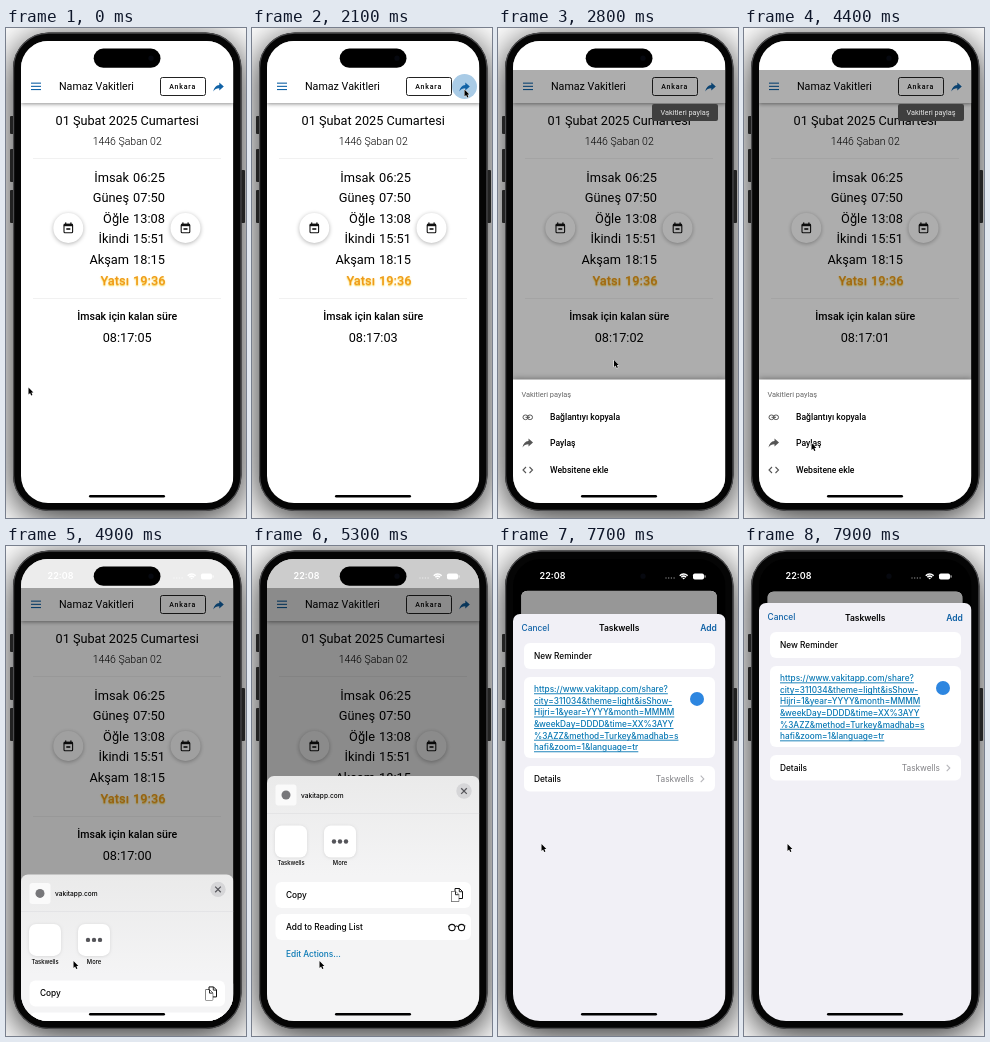
An HTML page with a canvas that plays this animation: 240 px wide and 490 px high, repeating every 8000 ms.

```html
<!DOCTYPE html>
<html lang="tr">
<head>
<meta charset="utf-8">
<title>Namaz Vakitleri</title>
<style>
html, body { margin: 0; width: 100%; height: 100%; overflow: hidden; background: #fff; }
canvas { display: block; width: 240px; height: 490px; }
</style>
</head>
<body>
<canvas id="stage"></canvas>
<script>
const LOOP = 8000;
const canvas = document.getElementById('stage');
const c = canvas.getContext('2d');
const dpr = window.devicePixelRatio || 1;
canvas.width = 240 * dpr;
canvas.height = 490 * dpr;

// screen of the phone
const L = 15, T = 13, W = 212.5, H = 462, MID = 121.2;
const ROBOTO = 'Roboto, "Open Sans", sans-serif';
const INTER = 'Inter, Roboto, sans-serif';
const BLUE = '#1062a6';
const LINK = '#0878b4';

const span = (t, a, b) => Math.min(1, Math.max(0, (t - a) / (b - a)));
const mix = (a, b, k) => a + (b - a) * k;
const easeIn = k => k * k;
const easeOut = k => 1 - (1 - k) ** 3;
const easeBoth = k => k * k * (3 - 2 * k);

function box(x, y, w, h, r, fill, stroke, lw = 1) {
  c.beginPath();
  c.roundRect(x, y, w, h, r);
  if (fill) { c.fillStyle = fill; c.fill(); }
  if (stroke) { c.strokeStyle = stroke; c.lineWidth = lw; c.stroke(); }
}

function rect(x, y, w, h, fill) {
  c.fillStyle = fill;
  c.fillRect(x, y, w, h);
}

function disc(x, y, r, fill) {
  c.beginPath();
  c.arc(x, y, r, 0, Math.PI * 2);
  c.fillStyle = fill;
  c.fill();
}

function path(pts, color, lw, closed) {
  c.beginPath();
  pts.forEach(([x, y], i) => i ? c.lineTo(x, y) : c.moveTo(x, y));
  if (closed) c.closePath();
  c.strokeStyle = color;
  c.lineWidth = lw;
  c.stroke();
}

// y is the middle of the capitals
function text(s, x, y, size, o = {}) {
  c.font = `${o.weight || 400} ${size}px ${o.font || ROBOTO}`;
  c.textAlign = o.align || 'left';
  c.letterSpacing = (o.gap || 0) + 'px';
  c.fillStyle = o.color || '#000';
  c.fillText(s, x, y + size * 0.355);
  const w = c.measureText(s).width;
  c.letterSpacing = '0px';
  return w;
}

const inter = (s, x, y, size, o = {}) => text(s, x, y, size, { font: INTER, weight: 500, ...o });

function shadow(color, blur, dy, draw) {
  c.save();
  c.shadowColor = color;
  c.shadowBlur = blur * dpr;
  c.shadowOffsetY = dy * dpr;
  draw();
  c.restore();
}

function arrowIcon(x, y, color) {
  c.beginPath();
  c.moveTo(x + 6, y - 4.5);
  c.lineTo(x + 10.5, y - 0.5);
  c.lineTo(x + 6, y + 3.5);
  c.lineTo(x + 6, y + 1.2);
  c.quadraticCurveTo(x + 2, y + 1.2, x, y + 4.5);
  c.quadraticCurveTo(x + 1, y - 1.6, x + 6, y - 2.1);
  c.closePath();
  c.fillStyle = color;
  c.fill();
}

function dateButton(x, y) {
  shadow('rgba(0,0,0,.3)', 4, 1, () => disc(x, y, 15, '#fff'));
  const ink = '#111';
  box(x - 4.3, y - 3.8, 8.6, 8.6, 1, null, ink, 1.1);
  rect(x - 4.5, y - 4.2, 9, 2.4, ink);
  rect(x - 3.2, y - 5.6, 1.2, 2, ink);
  rect(x + 2, y - 5.6, 1.2, 2, ink);
  rect(x - 2, y + 0.2, 4, 1.6, ink);
}

function phone() {
  rect(0, 0, 240, 490, '#fff');
  shadow('rgba(0,0,0,.85)', 36, 7, () => box(7, 4.5, 228.5, 478.5, 36, '#0a0a0a'));
  [[88, 18], [121, 33], [162, 33]].forEach(([y, h]) => box(4, y, 4, h, 1, '#222'));
  box(235, 142, 4, 53, 1, '#222');
  box(7.6, 5.1, 227.3, 477.3, 35, '#050505', '#4c4c4e', 1.2);
}

function ripple(t) {
  const grow = easeOut(span(t, 1880, 2080));
  const fade = 1 - span(t, 2200, 2550);
  if (grow > 0 && fade > 0) {
    c.globalAlpha = fade;
    disc(212.5, 58.5, 12.5 * grow, '#a9cbe6');
    c.globalAlpha = 1;
  }
}

function prayerPage(t) {
  rect(L, T, W, H, '#fff');
  shadow('rgba(0,0,0,.45)', 4, 1, () => rect(L, T, W, 62, '#fff'));

  [54.6, 57.8, 61].forEach(y => rect(25, y, 10, 1.1, BLUE));
  text('Namaz Vakitleri', 53, 58.5, 10.7);
  box(154.5, 49.5, 45, 18, 2, null, '#222');
  text('Ankara', 163.3, 58.5, 7, { weight: 500, gap: 0.8 });
  ripple(t);
  arrowIcon(207.3, 59, BLUE);

  const mid = { align: 'center' };
  text('01 Şubat 2025 Cumartesi', MID, 92, 12.7, mid);
  text('1446 Şaban 02', MID, 113, 10.5, { ...mid, weight: 300 });
  rect(27, 130, 188, 0.8, '#eeeeee');
  rect(27, 270, 188, 0.8, '#eeeeee');

  const rows = ['İmsak 06:25', 'Güneş 07:50', 'Öğle 13:08', 'İkindi 15:51', 'Akşam 18:15', 'Yatsı 19:36'];
  rows.forEach((row, i) => {
    const [name, hour] = row.split(' ');
    const y = 149 + i * 20.6;
    const last = i === 5;
    const o = last ? { weight: 500, color: '#ef9a1a' } : {};
    const put = () => {
      text(name, 123, y, 12.8, { ...o, align: 'right' });
      text(hour, 127, y, 12.8, o);
    };
    if (last) shadow('#f5c518', 1.5, 1, put);
    else put();
  });
  dateButton(62.3, 200);
  dateButton(179.5, 200);

  const left = 5 - Math.max(0, Math.min(5, Math.floor((t + 400) / 1000)));
  text('İmsak için kalan süre', MID, 288, 10.6, { ...mid, weight: 500 });
  text('08:17:0' + left, MID, 309, 12.7, mid);
}

function menuSheet(t) {
  const up = easeOut(span(t, 2300, 2750));
  const down = easeIn(span(t, 4650, 4950));
  rect(L, 42, W, 433, `rgba(0,0,0,${0.32 * span(t, 2300, 2600)})`);

  const tip = span(t, 2350, 2500) * (1 - span(t, 4700, 4900));
  if (tip > 0) {
    c.globalAlpha = tip;
    box(154, 76, 66, 17, 2, '#3f3f3f');
    text('Vakitleri paylaş', 187, 84.5, 7.3, { align: 'center', color: '#e8e8e8' });
    c.globalAlpha = 1;
  }
  if (up === 0 || down === 1) return;

  c.save();
  c.translate(0, 124 * (1 - up + down));
  shadow('rgba(0,0,0,.4)', 6, -1, () => rect(L, 351.5, W, 124, '#fff'));
  text('Vakitleri paylaş', 23.5, 366, 7.4, { color: '#666' });
  const grey = '#555';
  box(25, 387, 5, 4.6, 2.3, null, grey, 1);
  box(29.5, 387, 5, 4.6, 2.3, null, grey, 1);
  rect(27.5, 388.8, 4.5, 1, grey);
  arrowIcon(24.5, 415, grey);
  path([[28, 439], [25, 442], [28, 445]], grey, 1.1);
  path([[31.5, 439], [34.5, 442], [31.5, 445]], grey, 1.1);
  text('Bağlantıyı kopyala', 52, 389, 8.6, { weight: 500 });
  text('Paylaş', 52, 415, 8.6, { weight: 500 });
  text('Websitene ekle', 52, 441.5, 8.6, { weight: 500 });
  c.restore();
}

function copyIcon() {
  const ink = '#111';
  path([[203, 342.5], [207.5, 342.5], [210.5, 345.5], [210.5, 352.5], [203, 352.5]], ink, 1, true);
  c.fillStyle = '#fff';
  path([[199.5, 345.5], [203.7, 345.5], [206.7, 348.5], [206.7, 355.5], [199.5, 355.5]], ink, 1, true);
  c.fill();
  path([[203.5, 345.5], [203.5, 348.7], [206.7, 348.7]], ink, 0.9);
  path([[207.3, 342.5], [207.3, 345.7], [210.5, 345.7]], ink, 0.9);
}

function glassesIcon() {
  for (const x of [200, 209.5]) {
    c.beginPath();
    c.arc(x, 381.5, 3.1, 0, Math.PI * 2);
    c.strokeStyle = '#111';
    c.lineWidth = 1.1;
    c.stroke();
  }
  path([[203, 380.8], [204.7, 380], [206.5, 380.8]], '#111', 1);
  path([[196, 380], [197, 380.6]], '#111', 1);
  path([[213.4, 380], [212.5, 380.6]], '#111', 1);
}

function shareSheet(t) {
  const up = easeOut(span(t, 4750, 5320));
  if (up === 0) return;
  rect(L, T, W, H, `rgba(0,0,0,${0.2 * span(t, 4750, 5150)})`);

  c.save();
  c.translate(0, 246 * (1 - up) - easeBoth(span(t, 5500, 6200)));
  const bg = c.createLinearGradient(0, 230, 0, 330);
  bg.addColorStop(0, '#eaeaea');
  bg.addColorStop(1, '#f4f4f5');
  box(L, 230, W, 250, [7, 7, 0, 0], bg);

  const ready = span(t, 6600, 6700);
  box(23.5, 238.5, 21, 21, 3, '#fafafa');
  c.globalAlpha = 1 - ready;
  disc(34, 249, 4.5, '#77777a');
  inter('vakitapp.com', 49, 249.3, 6.6);
  c.globalAlpha = ready;
  disc(34, 249.5, 5, '#e29a3c');
  inter('Dilvo App', 49, 244.5, 7.6, { weight: 600 });
  inter('vakitapp.com', 49, 254.4, 6.6, { color: '#77777a' });
  c.globalAlpha = 1;

  disc(212, 245, 7.7, '#d6d6d8');
  path([[209.2, 242.2], [214.8, 247.8]], '#55555a', 1.2);
  path([[214.8, 242.2], [209.2, 247.8]], '#55555a', 1.2);
  rect(L, 267, W, 0.6, '#dedee0');

  shadow('rgba(0,0,0,.12)', 3, 0.5, () => {
    box(23, 279.5, 32, 32, 7, '#fff');
    box(72, 279.5, 32, 32, 7, '#fff');
  });
  [82, 88, 94].forEach(x => disc(x, 295.5, 2.2, '#55555a'));
  inter('Taskwells', 39, 317.3, 5.8, { align: 'center' });
  inter('More', 88, 317.3, 5.8, { align: 'center' });

  box(23.5, 336, 195.5, 26, 6, '#fff');
  box(23.5, 368, 195.5, 26, 6, '#fff');
  inter('Copy', 34, 349, 8.3);
  inter('Add to Reading List', 34, 381, 8.3);
  inter('Edit Actions…', 34, 408.3, 8.3, { color: LINK });
  copyIcon();
  glassesIcon();
  c.restore();
}

function composeSheet(t) {
  const up = easeOut(span(t, 7320, 7860));
  if (up === 0) return;
  c.save();
  c.translate(0, 420 * (1 - up));
  box(L, 57, W, 420, [7, 7, 0, 0], '#f1f0f6');
  inter('Cancel', 23.5, 71.5, 8.4, { color: BLUE });
  inter('Taskwells', MID, 71.5, 8.5, { weight: 600, align: 'center' });
  inter('Add', 218.8, 71.5, 8.5, { weight: 600, align: 'right', color: BLUE });

  box(26, 86, 191, 26, 6, '#fff');
  box(26, 120, 191, 81, 6, '#fff');
  box(26, 209, 191, 25.5, 6, '#fff');
  inter('New Reminder', 36, 98.8, 8.3);
  const url = [
    'https://www.vakitapp.com/share?',
    'city=311034&theme=light&isShow-',
    'Hijri=1&year=YYYY&month=MMMM',
    '&weekDay=DDDD&time=XX%3AYY',
    '%3AZZ&method=Turkey&madhab=s',
    'hafi&zoom=1&language=tr'
  ];
  url.forEach((line, i) => {
    const y = 132.3 + i * 11.6;
    const w = inter(line, 36, y, 8.25, { color: LINK });
    rect(36, y + 4.1, w, 0.9, LINK);
  });
  disc(199, 142, 7, '#2d86e0');
  inter('Details', 36, 222, 8.3);
  inter('Taskwells', 196, 222, 8.3, { weight: 400, align: 'right', color: '#808085' });
  path([[202.7, 218.8], [205.8, 222], [202.7, 225.2]], '#b5b5ba', 1.1);
  c.restore();
}

function statusBar() {
  inter('22:08', 54.5, 30.2, 9, { weight: 600, align: 'center', color: '#fff' });
  [168, 170.7, 173.4, 176.1].forEach(x => disc(x, 32, 0.7, 'rgba(255,255,255,.5)'));
  c.strokeStyle = '#fff';
  c.lineWidth = 1.5;
  [1, 3.2, 5.4].forEach(r => {
    c.beginPath();
    c.arc(185.7, 33.5, r, -Math.PI * 0.76, -Math.PI * 0.24);
    c.stroke();
  });
  box(195, 27.5, 11, 6, 1.8, '#fff');
  box(206.6, 29.3, 0.9, 2.4, 0.4, '#fff');
}

// [start, end, x, y, easing]
const moves = [
  [100, 820, 214.5, 61, easeBoth],
  [1000, 1700, 212.5, 61.5, easeBoth],
  [2300, 2800, 116, 332, easeIn],
  [2800, 3450, 67.5, 415, easeOut],
  [6050, 6400, 66, 403, easeIn],
  [6400, 7150, 43.5, 298, easeOut]
];

function pointer(t) {
  let x = 22.5, y = 359.5;
  for (const [a, b, px, py, ease] of moves) {
    const k = ease(span(t, a, b));
    x = mix(x, px, k);
    y = mix(y, py, k);
  }
  const shape = [[0, 0], [0, 7], [1.6, 5.6], [2.7, 8.1], [3.9, 7.6], [2.9, 5.1], [4.9, 4.9]];
  path(shape.map(([dx, dy]) => [x + dx, y + dy]), '#fff', 1, true);
  c.fillStyle = '#000';
  c.fill();
}

function draw(now) {
  const t = now % LOOP;
  c.setTransform(dpr, 0, 0, dpr, 0, 0);
  phone();

  c.save();
  c.beginPath();
  c.roundRect(L, T, W, H, 27);
  c.clip();
  rect(L, T, W, H, '#000');

  // the page shrinks into a card behind the last sheet
  const back = easeOut(span(t, 7320, 7860));
  const scale = mix(1, 195 / W, back);
  c.save();
  c.translate(mix(L, 23.5, back), mix(T, 45.5, back));
  c.scale(scale, scale);
  c.translate(-L, -T);
  c.beginPath();
  c.roundRect(L, T, W, H, 7 * back);
  c.clip();
  prayerPage(t);
  menuSheet(t);
  shareSheet(t);
  rect(L, T, W, H, `rgba(0,0,0,${0.27 * back})`);
  c.restore();

  composeSheet(t);
  statusBar();
  box(87.7, 20.6, 66.8, 19.2, 9.6, '#000');
  disc(145, 30.2, 2.6, '#06080f');
  box(83, 467, 76, 2.6, 1.3, '#000');
  c.restore();

  pointer(t);
}

let start;
function tick(now) {
  if (start === undefined) start = now;
  draw(now - start);
  requestAnimationFrame(tick);
}
draw(0);
requestAnimationFrame(tick);
</script>
</body>
</html>
```
